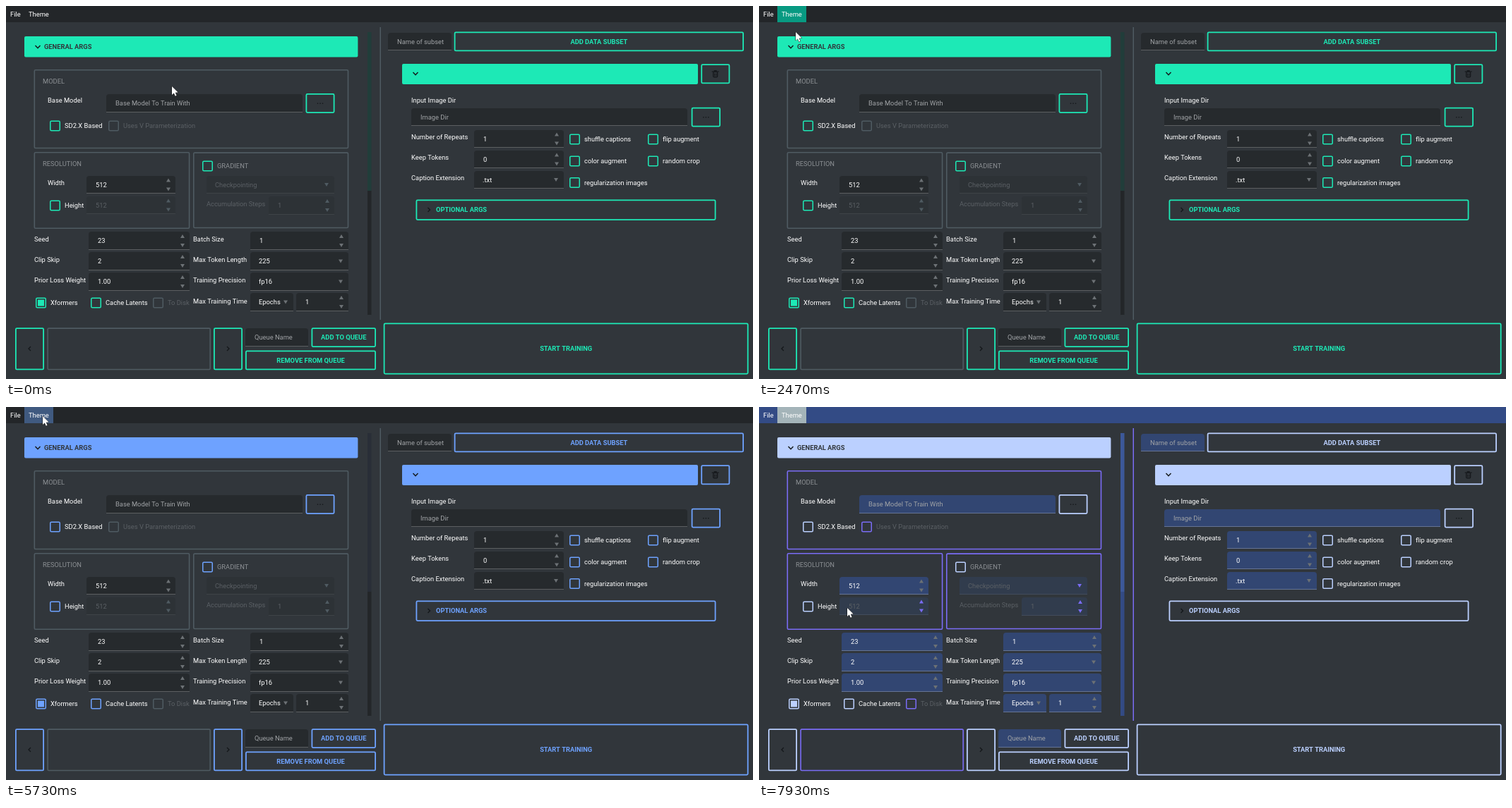
Write an HTML page with a canvas that moves like this. It is 1058 by 529 pixels and loops after 8 s.

```html
<!DOCTYPE html>
<html lang="en">
<head>
<meta charset="utf-8">
<title>Training settings</title>
<style>
  html, body { margin: 0; width: 100%; height: 100%; overflow: hidden; background: #31363b; }
  canvas { display: block; }
</style>
</head>
<body>
<canvas id="stage" width="1058" height="529"></canvas>
<script>
const ctx = document.getElementById('stage').getContext('2d');
const LOOP = 8000, FPS = 15;
const BG = '#31363b', WHITE = '#fff', MUTED = '#8c9094', HINT = '#a0a3a6', DIM = '#5b6065', DARK = '#14171a';

const THEMES = [
  { from: 0,  accent: '#1de9b6', fill: '#232629', line: '#4f5b62', hover: '#089a82', handle: '#213d3a' },
  { from: 53, accent: '#6ea2ff', fill: '#232629', line: '#4f5b62', hover: '#405a80', handle: '#292e37' },
  { from: 97, accent: '#bbd0ff', fill: '#334b85', line: '#7a6cf5', hover: '#a4b4b9', handle: '#3c5899' },
];
const MENUS = [
  { open: 13, dark: 15, sub: 21, close: 32 },
  { open: 59, dark: 62, sub: 63, close: 76 },
  { open: 102, dark: 104, sub: 108, close: 117 },
];
const COLORS = ['amber', 'blue', 'cyan', 'lightgreen', 'medical', 'pink', 'purple', 'red', 'teal', 'yellow'];

// Pointer path: tick, x, y
const PATH = [
  [0, 235, 114], [7, 50, 14], [12, 50, 14], [14, 50, 18], [17, 52, 34], [20, 52, 34], [23, 60, 40],
  [28, 105, 70], [32, 105, 70], [37, 52, 37], [40, 48, 22], [42, 48, 22], [45, 45, 9], [58, 45, 9],
  [61, 48, 20], [63, 56, 38], [66, 74, 42], [67, 83, 48], [69, 105, 110], [71, 127, 173], [72, 123, 175],
  [76, 123, 175], [86, 52, 13], [99, 52, 13], [102, 51, 15], [106, 58, 37], [109, 58, 37],
  [112, 124, 270], [114, 126, 278], [116, 126, 278], [119, 125, 285],
];

let theme;
const clamp = v => Math.max(0, Math.min(1, v));

function pointerAt(tick) {
  const i = PATH.findIndex(p => p[0] >= tick);
  if (i < 1) return PATH[i < 0 ? PATH.length - 1 : 0].slice(1);
  const [t0, x0, y0] = PATH[i - 1], [t1, x1, y1] = PATH[i];
  const k = (tick - t0) / (t1 - t0);
  return [Math.round(x0 + (x1 - x0) * k), Math.round(y0 + (y1 - y0) * k)];
}

function text(str, x, y, color = WHITE, bold = false, align = 'left') {
  ctx.font = `${bold ? 700 : 400} 9.33px Roboto, sans-serif`;
  ctx.textAlign = align;
  ctx.fillStyle = color;
  ctx.fillText(str, x, y + 3.3);
}

function rect(x0, y0, x1, y1, color) {
  ctx.fillStyle = color;
  ctx.fillRect(x0, y0, x1 - x0, y1 - y0);
}

function rounded(x0, y0, x1, y1, color, radii) {
  ctx.fillStyle = color;
  ctx.beginPath();
  ctx.roundRect(x0, y0, x1 - x0, y1 - y0, radii);
  ctx.fill();
}

// Outline drawn wholly inside the given edges
function frame(x0, y0, x1, y1, color = theme.line, width = 1.6) {
  ctx.strokeStyle = color;
  ctx.lineWidth = width;
  ctx.beginPath();
  ctx.roundRect(x0 + width / 2, y0 + width / 2, x1 - x0 - width, y1 - y0 - width, 1.5);
  ctx.stroke();
}

function poly(points, color, stroke) {
  ctx.beginPath();
  points.forEach(([x, y]) => ctx.lineTo(x, y));
  if (stroke) {
    ctx.strokeStyle = color;
    ctx.lineWidth = stroke;
    ctx.stroke();
  } else {
    ctx.closePath();
    ctx.fillStyle = color;
    ctx.fill();
  }
}

// dir is 1 for down, -1 for up
function arrow(x, y, dir, color) {
  poly([[x - 3, y - 2.5 * dir], [x + 3, y - 2.5 * dir], [x, y + 2.5 * dir]], color);
}

const chevronDown = (x, y) => poly([[x - 3.5, y - 2], [x, y + 1.8], [x + 3.5, y - 2]], DARK, 1.4);
const chevronSide = (x, y, dir, s = 3) =>
  poly([[x - 1.5 * dir, y - s], [x + 1.5 * dir, y], [x - 1.5 * dir, y + s]], DARK, 1.3);

function button(x0, y0, x1, y1, label) {
  frame(x0, y0, x1, y1, theme.accent, 1.8);
  if (label) text(label, (x0 + x1) / 2, (y0 + y1) / 2, theme.accent, true, 'center');
}

function browse(x0, y0, x1, y1) {
  button(x0, y0, x1, y1);
  const x = (x0 + x1) / 2, y = (y0 + y1) / 2;
  for (const d of [-3.5, 0, 3.5]) rect(x + d - .7, y - .5, x + d + .7, y + .9, DARK);
}

function field(x0, y0, x1, y1, value, { kind = 'spin', off = false, pad = 13, color = WHITE } = {}) {
  const mid = (y0 + y1) / 2;
  ctx.globalAlpha = off ? .25 : .75;
  rounded(x0, y0, x1, y1, theme.fill, [4, 4, 0, 0]);
  rect(x0, y1 - 1, x1, y1, 'rgba(255,255,255,.33)');
  ctx.globalAlpha = 1;
  text(value, x0 + pad, mid, off ? DIM : color);
  const tint = off ? theme.line : '#6c7175';
  if (kind === 'spin') {
    arrow(x1 - 10, mid - 6.5, -1, tint);
    arrow(x1 - 10, mid + 6.5, 1, tint);
  } else if (kind === 'combo') arrow(x1 - 11, mid, 1, tint);
}

const input = (x0, y0, x1, y1, hint) => field(x0, y0, x1, y1, hint, { kind: 'text', color: HINT });
const combo = (x0, y0, x1, y1, value, off) => field(x0, y0, x1, y1, value, { kind: 'combo', off, pad: 12 });

function check(x, y, label, { off = false, on = false, color = WHITE } = {}) {
  frame(x - 7, y - 7.5, x + 8, y + 7.5, off ? theme.line : theme.accent, 1.5);
  if (on) rect(x - 4, y - 4.5, x + 5, y + 4.5, theme.accent);
  text(label, x + 14, y, off ? DIM : color);
}

function trash(x, y) {
  frame(x - 3.6, y - 3.6, x + 3.6, y + 5, DARK, 1.2);
  rect(x - 5, y - 4, x + 5, y - 2.8, DARK);
  rect(x - 2, y - 5.5, x + 2, y - 4, DARK);
  rect(x - 1.6, y - 1, x - .6, y + 3, DARK);
  rect(x + .6, y - 1, x + 1.6, y + 3, DARK);
}

function leftPanel() {
  rounded(26, 43, 498.4, 72.4, theme.accent, 2);
  chevronDown(45, 58);
  text('GENERAL ARGS', 54, 58, BG, true);
  rect(512, 37, 517.5, 262, theme.handle);
  rect(512, 262, 517.5, 438, theme.fill);

  frame(39.5, 90, 485.3, 202.3);
  text('MODEL', 52, 107, MUTED);
  text('Base Model', 59, 134);
  input(142, 125, 420, 151, 'Base Model To Train With');
  browse(424.5, 124, 465.5, 152);
  check(69, 170, 'SD2.X Based');
  check(152, 170, 'Uses V Parameterization', { off: true });

  frame(39.5, 207, 260.4, 316);
  text('RESOLUTION', 52, 224, MUTED);
  text('Width', 59, 251);
  field(114, 241, 240, 266, '512');
  check(69, 283, 'Height');
  field(114, 270, 240, 295, '512', { off: true });

  frame(265, 207.3, 485.3, 315.3);
  check(285, 227, 'GRADIENT', { color: MUTED });
  combo(284, 241, 465, 266, 'Checkpointing', true);
  text('Accumulation Steps', 284, 281, DIM);
  field(372, 270, 465, 296, '1', { off: true });

  [['Seed', '23', 'Batch Size', '1'],
   ['Clip Skip', '2', 'Max Token Length', '225'],
   ['Prior Loss Weight', '1.00', 'Training Precision', 'fp16']].forEach(([a, av, b, bv], i) => {
    const y = 320 + i * 29;
    text(a, 40, y + 10.5);
    field(117, y, 260, y + 26, av);
    text(b, 265, y + 10.5);
    i ? combo(346, y, 485, y + 26, bv) : field(346, y, 485, y + 26, bv);
  });
  check(49, 421, 'Xformers', { on: true });
  check(127, 421, 'Cache Latents');
  check(215, 421, 'To Disk', { off: true });
  text('Max Training Time', 265, 418.5);
  combo(346, 407, 407, 433, 'Epochs');
  field(411, 407, 485, 433, '1');
}

function bottomBar() {
  button(13, 456.3, 54, 516.3);
  chevronSide(33.5, 486, -1);
  frame(58.3, 456.3, 290, 516.3);
  button(294, 456.3, 335, 516.3);
  chevronSide(314.5, 486, 1);
  input(339, 457, 428, 483, 'Queue Name');
  button(432.5, 456.3, 524, 484, 'ADD TO QUEUE');
  button(339, 488.5, 524, 516.3, 'REMOVE FROM QUEUE');
  button(534.7, 449.5, 1051.6, 522.5, 'START TRAINING');
}

function rightPanel() {
  rect(529.5, 30, 531, 445, theme.line);
  input(541, 38, 631, 63, 'Name of subset');
  button(634.7, 36.5, 1045, 64.3, 'ADD DATA SUBSET');
  rounded(561, 82, 980, 111, theme.accent, 2);
  chevronDown(580, 96);
  button(984.3, 82.3, 1025.3, 110.3);
  trash(1004.7, 96.5);
  text('Input Image Dir', 574, 134);
  input(574, 145, 965, 170, 'Image Dir');
  browse(970.7, 143.7, 1012, 171.5);
  text('Number of Repeats', 574, 186);
  field(663, 176, 790, 201, '1');
  text('Keep Tokens', 574, 215);
  field(663, 205, 790, 230, '0');
  text('Caption Extension', 574, 244);
  combo(663, 234, 790, 259, '.txt');
  check(805, 189, 'shuffle captions');
  check(916, 189, 'flip augment');
  check(805, 220, 'color augment');
  check(916, 220, 'random crop');
  check(805, 250.5, 'regularization images');
  button(580.5, 274.5, 1005.5, 304);
  chevronSide(599, 289, 1);
  text('OPTIONAL ARGS', 609, 289, theme.accent, true);
}

function menuBar(tick) {
  rect(0, 0, 1058, 23, theme.fill);
  const lit = tick >= 6 && !(tick >= 53 && tick < 59) && !(tick >= 97 && tick < 100);
  if (lit) rect(26, 0, 67, 23, theme.hover);
  text('File', 6, 12);
  text('Theme', 32, 12);
}

function popup(x0, x1, items, selected, alpha) {
  if (alpha <= 0) return;
  const bottom = 25 + items.length * 32;
  ctx.globalAlpha = alpha;
  ctx.shadowColor = 'rgba(0,0,0,.4)';
  ctx.shadowBlur = 6;
  ctx.shadowOffsetX = ctx.shadowOffsetY = 2;
  rect(x0, 23, x1, bottom + 1, theme.fill);
  ctx.shadowColor = 'transparent';
  if (selected >= 0) rect(x0 + 1, 24 + selected * 32, x1 - 1, 56 + selected * 32, theme.hover);
  frame(x0, 23, x1, bottom + 1, theme.line, 1.4);
  items.forEach((name, i) => text(name, x0 + 12.3, 41 + i * 32.05));
  ctx.globalAlpha = 1;
}

function menus(tick, [px, py]) {
  const menu = MENUS.find(m => tick >= m.open && tick < m.close + 3);
  if (!menu) return;
  const fadeOut = clamp(1 - (tick - menu.close + 1) / 3);
  const fade = start => Math.min(clamp((tick - start + 1) / 3), fadeOut);
  const alpha = fade(menu.open);
  const dark = tick >= menu.dark;
  popup(26.5, 84.5, ['Dark', 'Light'], dark ? 0 : -1, alpha);
  ctx.globalAlpha = alpha;
  [41, 73].forEach((y, i) =>
    poly([[70, y - 2.7], [75, y], [70, y + 2.7]], !i && dark ? theme.line : theme.accent));
  ctx.globalAlpha = 1;
  if (tick >= menu.sub) popup(81.5, 159.7, COLORS, px > 84 ? Math.floor((py - 24) / 32) : -1, fade(menu.sub));
}

function pointer([x, y]) {
  const shape = [[0, 0], [0, 12], [2.8, 9.4], [4.7, 13.8], [6.6, 13], [4.8, 8.7], [8.6, 8.5]]
    .map(([dx, dy]) => [x + dx, y + dy]);
  poly([...shape, shape[0]], '#111', 1);
  poly(shape, WHITE);
}

function draw() {
  const tick = Math.floor((performance.now() % LOOP + 5) * FPS / 1000);
  const at = pointerAt(tick);
  theme = THEMES.findLast(t => tick >= t.from);
  rect(0, 0, 1058, 529, BG);
  leftPanel();
  bottomBar();
  rightPanel();
  menuBar(tick);
  menus(tick, at);
  pointer(at);
  requestAnimationFrame(draw);
}
draw();
</script>
</body>
</html>
```
